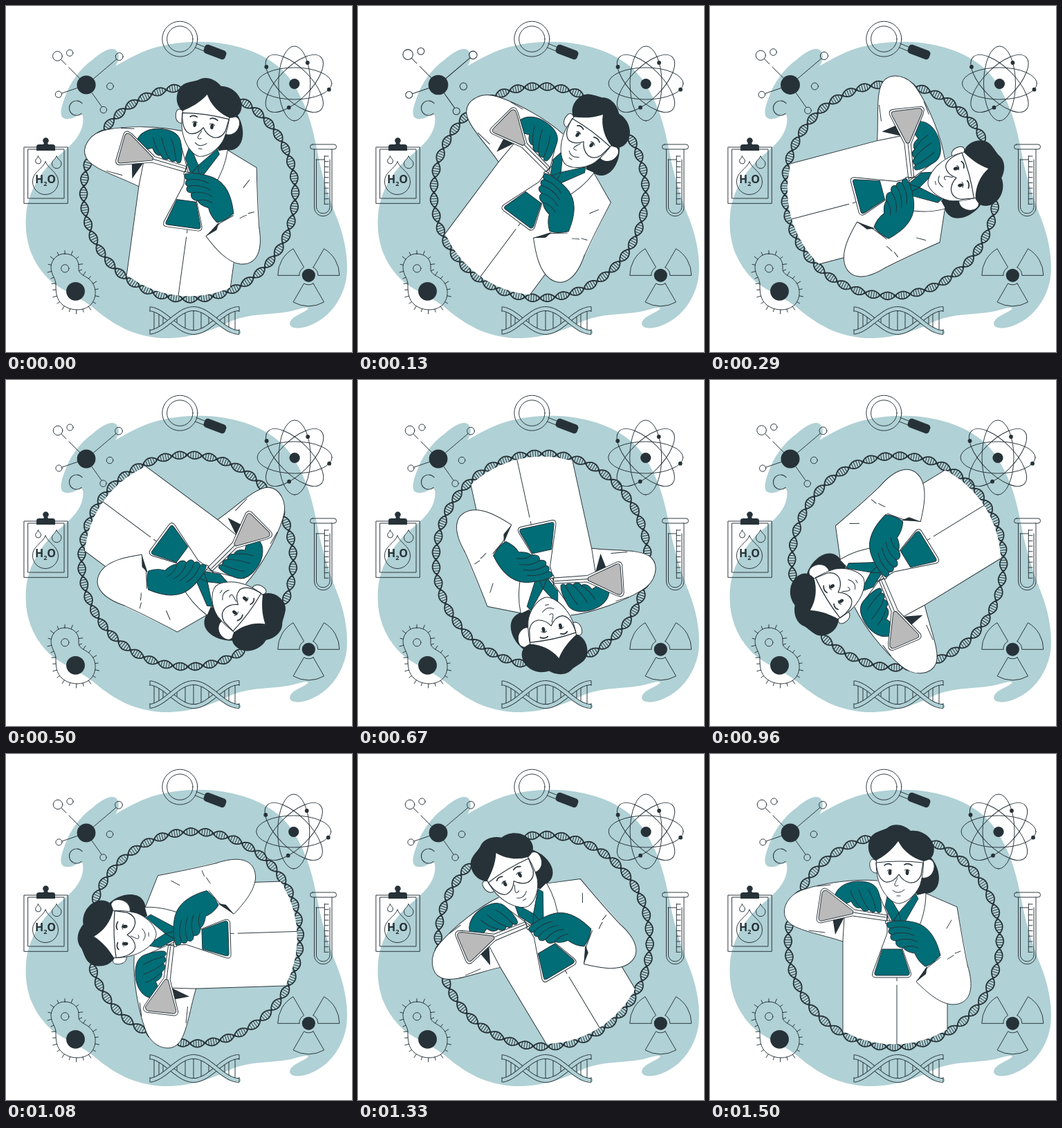
An HTML page that plays this animation: 500 px wide and 500 px high, repeating every 1540 ms.

```html
<!DOCTYPE html>
<html lang="en">
<head>
<meta charset="utf-8">
<title>Chemistry lab</title>
<style>
html, body { margin: 0; width: 100%; height: 100%; overflow: hidden; background: #fff; }
svg { display: block; width: 100vw; height: 100vh; }
.l { fill: none; stroke: #263238; stroke-width: .95; stroke-linecap: round; stroke-linejoin: round; }
.w { fill: #fff; }
.d { fill: #263238; }
.t { fill: #006d77; }
.g { fill: #bababa; }
text { font: bold 16px "Open Sans", "Noto Sans", sans-serif; font-stretch: 75%; text-anchor: middle; }
</style>
</head>
<body>
<svg viewBox="0 0 500 500">
<defs>
  <clipPath id="inside"><circle cx="265.8" cy="270.5" r="149"/></clipPath>
</defs>

<path fill="#b0d1d5" d="M290 52C262 51 236 54 212 61C191 68 173 78 158 87C164 79 165 68 158 63C149 59 135 69 126 77C105 92 92 112 85 132C79 148 77 158 83 162C90 165 98 162 104 158C112 153 112 162 111 170C108 188 95 200 80 213C52 235 32 267 29 302C26 340 38 370 60 393C80 413 107 419 131 440C156 461 186 478 226 480C264 481 296 470 322 457C352 443 385 447 412 441C424 438 434 434 437 437C433 443 411 448 410 459C411 467 425 467 438 462C468 451 487 423 492 393C496 361 487 326 474 296C465 272 456 243 450 211C443 174 435 143 414 111C391 73 338 54 290 52Z"/>

<g id="lens">
  <path class="l" d="M275 54.5L288 59.5M273.5 60L286 65"/>
  <circle class="l" cx="251.3" cy="47.7" r="25.5"/>
  <circle class="l" cx="251.3" cy="47.7" r="18.7"/>
  <rect class="d" x="-16.5" y="-6.7" width="33" height="13.4" rx="4.5" transform="translate(302 66.5) rotate(21)"/>
</g>

<circle class="l" cx="102" cy="147.5" r="10.6" stroke-dasharray="50 16.6" transform="rotate(48 102 147.5)"/>
<g id="molecule">
  <path class="l" d="M116 114L91 89M87 85L80 78M116 114L159 77.5M116 114L81 126M116 114L138 145"/>
  <circle class="d" cx="116" cy="114" r="13.4"/>
  <g class="l">
    <circle class="w" cx="75" cy="73" r="6.8"/><circle class="w" cx="92.5" cy="68.5" r="4.6"/>
    <circle cx="163" cy="73.7" r="5.4"/><circle class="w" cx="76.5" cy="127.5" r="4.6"/>
    <circle cx="140.5" cy="149.5" r="4.7"/><circle cx="150" cy="116" r="4.8"/>
  </g>
</g>

<g id="atom">
  <g id="orbits" class="l"></g>
  <g class="d">
    <circle cx="417" cy="112.5" r="7.6"/><circle cx="376.5" cy="88" r="2.9"/>
    <circle cx="436" cy="82" r="2.9"/><circle cx="467" cy="120.7" r="2.9"/><circle cx="409" cy="146.7" r="2.9"/>
  </g>
</g>

<g id="board">
  <path class="l" d="M26.3 204H89.3V285.3H26.3ZM32 207H84V278H32Z"/>
  <path class="d" d="M44 209V203Q44 200 48 200H54L55 198A4.3 4.3 0 1 1 60 198L61 200H67Q71 200 71 203V209Z"/>
  <path class="l" d="M57 225C53 236 38 240 38.5 254A18.5 18.5 0 0 0 75.5 254C75.5 240 61 236 57 225ZM46.5 217C45 221 42.6 221 42.6 224A4 4 0 0 0 50.6 224C50.6 221 48 221 46.5 217ZM73 217C71 222 66.5 223 66.5 228A6.7 6.7 0 0 0 80 228C80 223 75 222 73 217Z"/>
  <text class="d" x="57" y="255.5">H<tspan dy="4" font-size="9">2</tspan><tspan dy="-4">O</tspan></text>
</g>

<g class="l">
  <rect x="439.5" y="200" width="38" height="7" rx="3.5"/>
  <path d="M445.5 207V292A12.8 12.8 0 0 0 471 292V207M448.5 222V291A9.8 9.8 0 0 0 468 291V222M448 222H460"/>
  <path id="ticks"/>
</g>

<path class="l" id="hairs"/>
<path id="cell" class="l" d="M85 358C98 358 106 367 105 378C104 386 110 388 118 393C131 402 132 419 124 430C115 441 95 442 82 432C72 424 72 412 72 402C72 394 65 388 65 377C66 366 74 358 85 358Z"/>
<circle class="l" cx="85.3" cy="379.3" r="5.6"/>
<circle class="d" cx="100.5" cy="412.3" r="13.4"/>

<path class="l" id="blades"/>
<circle class="d" cx="437.3" cy="389.3" r="9.6"/>

<g id="helix"></g>

<g id="spin">
  <path id="rungs" class="l"/>
  <path id="strands" class="l" style="stroke-width:1.8"/>

  <path class="d" d="M315 145C332 160 336 187 324 197C316 204 306 201 300 204L288 190Z"/>
  <g clip-path="url(#inside)">
    <path class="w" d="M242 182L258 204H300L311 201L357 221L374 310L343 362V430H192V262Z"/>
    <path class="l" d="M192 262V430M343 361V430M270 323V328M270 334V430M311 201L357 221C361 246 368 286 373 309"/>
  </g>
  <path class="l" d="M312 202C312 222 306 242 299 257M243 200L262 246M349 240L342 252M337 302Q345 294 352 291M354 288L362 285M341 306L362 303"/>

  <path class="w" d="M256 195H298L272 232Z"/>
  <path class="l t" d="M257 202L273 229L264 243L253 221ZM297 202L301 209L281 244L264 243L273 229Z"/>
  <path class="l" d="M273 229L276 244"/>

  <path class="l w" d="M241 155C235 149 230 153 231 162C232 170 238 174 243 171ZM308 155C317 148 325 154 324 164C323 174 315 181 306 179Z"/>
  <path class="l w" d="M241 146C239 163 241 180 247 192C253 205 264 216 273 216C285 215 299 202 304 188C308 174 309 162 308 146L273 122Z"/>
  <path class="d" d="M240 154C230 149 226 135 231 123C236 112 248 111 256 107C266 99 280 102 290 111C307 109 321 121 323.5 134C325 146 320 153 309 155C293 151 279 140 272 126C263 139 251 148 240 154Z"/>
  <path class="l" style="stroke-width:1.7" d="M252 161Q256 157 262 160M281 160Q286 157 292 161"/>
  <g class="d"><ellipse cx="260" cy="171" rx="2.4" ry="3.9"/><ellipse cx="285" cy="171" rx="2.4" ry="3.9"/></g>
  <path class="l" d="M256 169Q259 165 263 168M281 168Q285 165 289 169M271 179C269 184 266 188 267 190Q269 192 272 190M264 197Q272 204 281 196M270 205L275 205"/>
  <path class="l" style="stroke-width:1.2" d="M240 157Q273 153 308 157L305 175Q300 187 289 186Q279 184 273 174Q265 186 254 185Q242 181 240 157Z"/>

  <path class="l w" d="M242 183C210 180 164 186 135 196C110 204 102 227 111 240C121 255 160 260 192 271"/>
  <path class="w" d="M191 236V269L240 245V195Z"/>
  <path class="l" d="M192 270L194 236M143 255L166 258M155 191L174 189"/>
  <path class="d" d="M177 236L195 234L181 261Z"/>

  <path class="l t" d="M180 208C181 194 196 184 215 184C231 184 241 189 244 201C247 211 249 222 247 228C244 231 241 229 240 226C238 230 232 229 230 225C225 229 220 227 218 222C211 224 207 219 204 213C198 216 193 217 187 218Z"/>
  <path class="l" d="M203 198Q208 213 218 222M215 196Q221 214 230 225M229 196Q236 208 240 226"/>
  <path class="l w" d="M166 194Q161 194 160 199L154 238Q154 244 160 244L206 234L255 241L256 233L209 225L172 197Z"/>
  <path class="l g" d="M167 197Q163 197 162 201L157 237Q157 242 162 241L206 231L207 227L171 199Z"/>
  <path class="l" d="M207 229L254 236M257 230L256 242"/>

  <path class="l w" d="M254 241H272V245H270V259L290 315Q292 322 286 323H240Q233 323 235 316L256 259V245H254Z"/>
  <path class="l t" d="M249 282H277L288 315Q289 320 285 320H241Q237 320 238 316Z"/>

  <path class="l w" d="M372 305C382 336 378 361 352 362C333 362 314 345 298 329L315 308L333 294"/>
  <path class="d" d="M298 329L314 306L312 318Z"/>
  <path class="l t" d="M256 244C264 240 285 240 298 244C318 250 328 270 333 291C326 299 319 305 311 307C304 302 299 296 296 288C289 287 283 285 279 280C272 280 267 276 269 270C262 270 259 266 262 261C257 259 257 255 260 252C256 251 254 247 256 244Z"/>
  <path class="l" d="M260 252Q277 247 291 253M262 261Q279 255 295 262M269 270Q284 264 299 271M279 280Q288 275 301 280"/>
</g>
</svg>

<script>
const $ = id => document.getElementById(id);
const PI = Math.PI, LOOP = 1540;
const polar = (cx, cy, r, a) => (cx + r * Math.cos(a)).toFixed(2) + ' ' + (cy + r * Math.sin(a)).toFixed(2);
const range = (n, f) => Array.from({ length: n }, (_, i) => f(i));

// DNA ring: two waves around a circle with rungs in each lobe
const ring = { x: 265.8, y: 270.5, r: 153, amp: 5.4, lobes: 44 };
const swell = a => {
  const c = Math.cos(a * ring.lobes / 2);
  return ring.amp * Math.sign(c) * Math.abs(c) ** .8;
};
const wave = s => 'M' + range(529, i => {
  const a = i / 528 * 2 * PI;
  return polar(ring.x, ring.y, ring.r + s * swell(a), a);
}).join('L');
$('strands').setAttribute('d', wave(1) + wave(-1));
$('rungs').setAttribute('d', range(ring.lobes * 6, i => {
  const a = (i + .5) / (ring.lobes * 6) * 2 * PI, h = swell(a);
  return 'M' + polar(ring.x, ring.y, ring.r - h, a) + 'L' + polar(ring.x, ring.y, ring.r + h, a);
}).join(''));

$('orbits').innerHTML = [0, 45, 90, 135].map(a =>
  `<ellipse cx="417" cy="112" rx="54" ry="23" transform="rotate(${a} 417 112)"/>`).join('');

$('ticks').setAttribute('d', 'M460.3 216.5V286.5' + range(10, i => `M460.3 ${217 + i * 7.7}H466`).join(''));

$('blades').setAttribute('d', [60, 180, 300].map(deg => {
  const a = deg * PI / 180, b = a + PI / 3, p = (r, t) => polar(437.3, 389.3, r, t);
  return `M${p(13.5, a)}L${p(44.5, a)}A44.5 44.5 0 0 1 ${p(44.5, b)}L${p(13.5, b)}A13.5 13.5 0 0 0 ${p(13.5, a)}Z`;
}).join(''));

const cell = $('cell'), len = cell.getTotalLength();
$('hairs').setAttribute('d', range(25, i => {
  const s = i / 25 * len, p = cell.getPointAtLength(s), q = cell.getPointAtLength(s + .5);
  const k = (i % 2 ? 6 : 4.5) / (Math.hypot(q.x - p.x, q.y - p.y) || 1);
  return `M${p.x} ${p.y}l${(q.y - p.y) * k} ${(p.x - q.x) * k}`;
}).join(''));

// Flat helix along the bottom
const bend = x => 17 * Math.cos((x - 271) * PI / 66);
const strand = s => 'M' + range(66, i => {
  const x = 208 + i * 129 / 65;
  return x.toFixed(1) + ' ' + (454.5 + s * bend(x)).toFixed(2);
}).join('L');
const tube = s => `<path class="l" style="stroke-width:6.8;stroke-linecap:butt" d="${strand(s)}"/>` +
  `<path class="l" style="stroke:#b0d1d5;stroke-width:5" d="${strand(s)}"/>`;
$('helix').innerHTML = '<path class="l" d="' + [214, 221, 227, 247, 259, 271, 282, 293, 316, 322, 331]
  .map(x => `M${x} ${454.5 - bend(x)}V${454.5 + bend(x)}`).join('') + '"/>' + tube(1) + tube(-1) +
  '<path class="l" d="M208 435V441.500M208 467.500V474M337 435V441.500M337 467.500V474"/>';

// Piecewise linear curve through [x, y] points
function curve(pts, x) {
  let i = 1;
  while (i < pts.length - 1 && x > pts[i][0]) i++;
  const [x0, y0] = pts[i - 1], [x1, y1] = pts[i];
  return y0 + (y1 - y0) * (x - x0) / (x1 - x0);
}
const turn = [[0, 7.8], [7, 75.2], [12, 126.6], [20, 208.8], [26, 268.2], [32, 329], [35, 359], [36, 360]];
const shake = [[0, 0], [.1, -1], [.2, 2], [.3, -4], [.4, 4], [.5, -4], [.6, 4], [.7, -4], [.8, 2], [.9, -1], [1, 0]];
const beat = [[0, 1], [.11, 1.075], [.33, 1], [.5, 1], [.6, 1.025], [.7, 1], [1, 1]];

function draw(ms) {
  const t = Math.floor(ms % LOOP / 10) * 10;
  const step = Math.floor((t + 9.9) * 24 / 1000); // 24 poses a second
  const angle = curve(turn, step), p = angle / 360, s = curve(beat, p);
  $('spin').setAttribute('transform', `rotate(${angle} 266.3 265)`);
  $('atom').setAttribute('transform', `translate(${curve(shake, p)} 0)`);
  $('molecule').setAttribute('transform', `translate(116 114) scale(${s}) translate(-116 -114)`);
}

let start;
function tick(now) {
  start ??= now;
  draw(now - start);
  requestAnimationFrame(tick);
}
draw(0);
requestAnimationFrame(tick);
</script>
</body>
</html>
```
